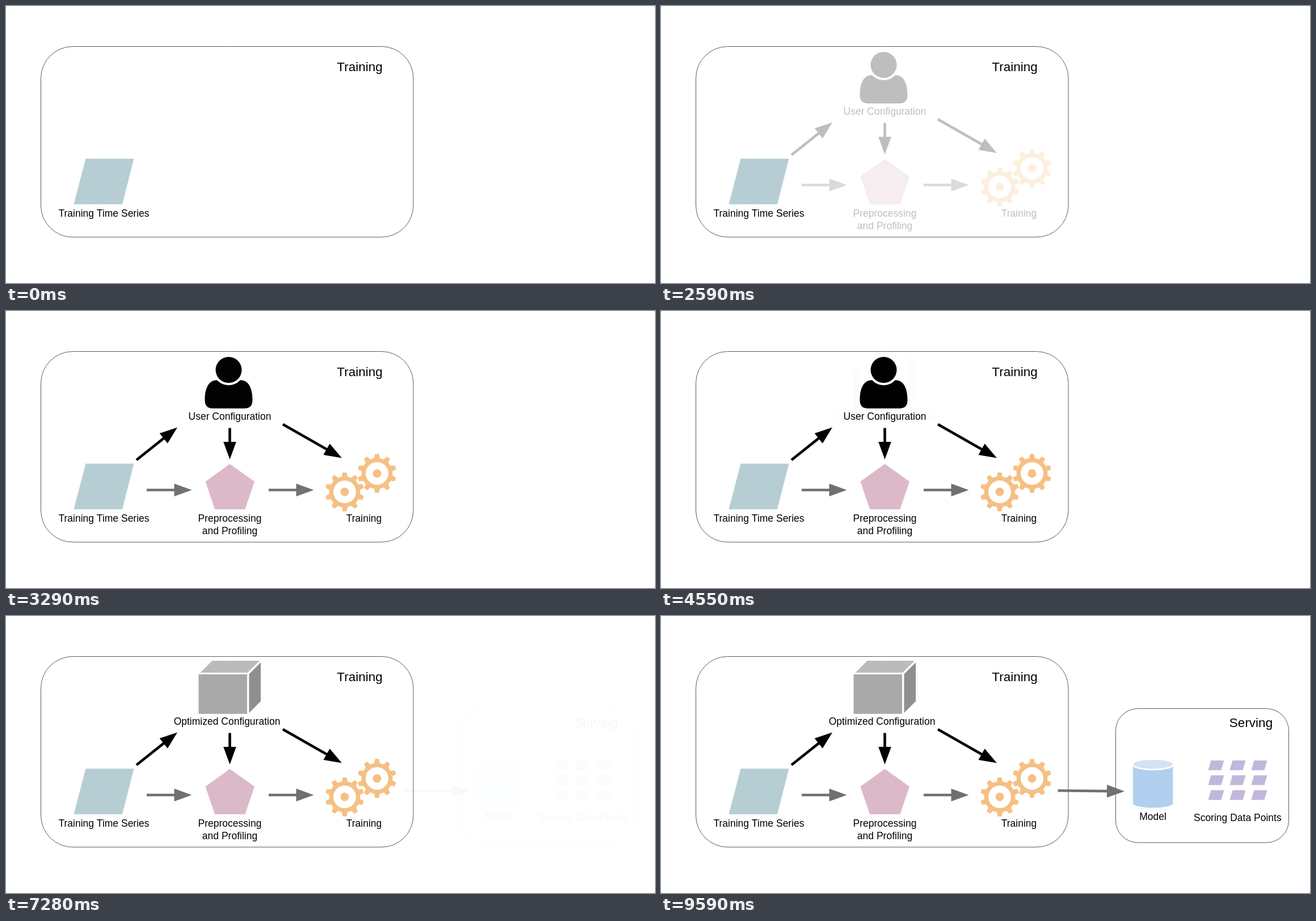
Animation, 1144 px wide and 489 px high, one loop 9730 ms. Source, as an HTML page with a canvas:

```html
<!DOCTYPE html>
<html lang="en">
<head>
<meta charset="utf-8">
<title>Training and serving pipeline</title>
<style>
html, body { margin: 0; width: 100%; height: 100%; overflow: hidden; background: #fff; }
canvas { display: block; width: 1144px; height: 489px; }
</style>
</head>
<body>
<canvas id="stage" width="1144" height="489"></canvas>
<script>
const W = 1144, H = 489, LOOP = 9730, STEP = 70;
const BLACK = '#000', GRAY = '#707070';
const ctx = document.getElementById('stage').getContext('2d');

// Each layer is painted once and then faded as a whole.
function layer(paint) {
  const c = document.createElement('canvas');
  c.width = W;
  c.height = H;
  paint(c.getContext('2d'));
  return c;
}

function poly(g, color, ...pts) {
  g.fillStyle = color;
  g.beginPath();
  pts.forEach(([x, y]) => g.lineTo(x, y));
  g.closePath();
  g.fill();
}

function label(g, text, x, y, size = 17.5) {
  g.font = `${size}px "Liberation Sans", Arial, sans-serif`;
  g.textAlign = 'center';
  g.fillStyle = BLACK;
  g.fillText(text, x, y);
}

function frame(g, x, y, w, h, r) {
  g.strokeStyle = '#595959';
  g.lineWidth = 1;
  g.beginPath();
  g.roundRect(x, y, w, h, r);
  g.stroke();
}

function arrow(g, color, x1, y1, x2, y2) {
  const len = Math.hypot(x2 - x1, y2 - y1), neck = len - 31;
  g.save();
  g.translate(x1, y1);
  g.rotate(Math.atan2(y2 - y1, x2 - x1));
  poly(g, color, [0, -2.3], [neck, -2.3], [neck, -11.3], [len, 0],
    [neck, 11.3], [neck, 2.3], [0, 2.3]);
  g.restore();
}

function gear(g, cx, cy) {
  const teeth = 10, pitch = 2 * Math.PI / teeth;
  const profile = [[-0.29, 27.5], [-0.16, 34.5], [0.16, 34.5], [0.29, 27.5]];
  for (let i = 0; i < teeth; i++) {
    for (const [off, r] of profile) {
      const a = -Math.PI / 2 + (i + off) * pitch;
      const x = cx + r * Math.cos(a), y = cy + r * Math.sin(a);
      if (i === 0 && off === -0.29) g.moveTo(x, y);
      else g.lineTo(x, y);
    }
  }
  g.closePath();
  g.moveTo(cx + 20, cy);
  g.arc(cx, cy, 20, 0, 2 * Math.PI, true);
  g.moveTo(cx + 7.5, cy);
  g.arc(cx, cy, 7.5, 0, 2 * Math.PI);
}

const base = layer(g => {
  frame(g, 61.5, 71.5, 656.5, 336.5, 56);
  label(g, 'Training', 623.5, 115, 22.5);
  poly(g, '#b6ced3', [140.5, 269.5], [225.5, 269.5], [205, 350], [119.5, 350]);
  label(g, 'Training Time Series', 172.5, 371.8);
  g.fillStyle = '#999';
  for (const x of [0, W - 1]) for (const y of [0, H - 1]) g.fillRect(x, y, 1, 1);
});

const pipeline = layer(g => {
  arrow(g, BLACK, 230, 263, 302, 205.5);
  arrow(g, BLACK, 394.5, 206.5, 394.5, 262);
  arrow(g, BLACK, 488, 200, 592, 259.5);
  arrow(g, GRAY, 248, 316, 327.5, 316);
  arrow(g, GRAY, 463, 316, 542.5, 316);
  poly(g, '#dcb9c9', [394.5, 270], [438, 301], [421.5, 350], [368, 350], [351.5, 301]);
  label(g, 'Preprocessing', 394.5, 371.8);
  label(g, 'and Profiling', 394.5, 393.5);
  g.fillStyle = '#f5c083';
  g.beginPath();
  gear(g, 597, 319.3);
  gear(g, 654, 286.7);
  g.fill();
  label(g, 'Training', 631, 371.8);
});

const user = layer(g => {
  g.fillStyle = '#fff';
  g.fillRect(349, 79, 86.5, 94);
  g.fillStyle = BLACK;
  g.beginPath();
  g.arc(392.5, 104, 23, 0, 2 * Math.PI);
  g.fill();
  g.beginPath();
  g.arc(392.5, 103, 28, 0.75, Math.PI - 0.75, false);
  g.bezierCurveTo(357, 122, 350.5, 137, 350.5, 157);
  g.bezierCurveTo(350.5, 167, 355, 172, 365, 172);
  g.lineTo(420, 172);
  g.bezierCurveTo(430, 172, 434.5, 167, 434.5, 157);
  g.bezierCurveTo(434.5, 137, 428, 122, 413, 122);
  g.fill();
  label(g, 'User Configuration', 394.5, 192.4);
});

const optimizer = layer(g => {
  poly(g, '#bbbbb9', [342.5, 100], [363.5, 79], [447, 79], [426, 100]);
  poly(g, '#a9a9a9', [339.5, 103], [425, 103], [425, 172.7], [339.5, 172.7]);
  poly(g, '#8f8f8f', [428.5, 102.5], [449, 82], [449, 150.5], [428.5, 171]);
  label(g, 'Optimized Configuration', 389.5, 192.4);
});

const serving = layer(g => {
  frame(g, 801.5, 163.5, 305, 236.5, 39);
  label(g, 'Serving', 1040, 196.3, 22.5);
  arrow(g, GRAY, 699.5, 308.2, 817, 309.5);

  const cx = 867.2, rx = 35.2;
  g.fillStyle = '#b1cfee';
  g.beginPath();
  g.ellipse(cx, 331, rx, 7.5, 0, 0, Math.PI);
  g.lineTo(cx - rx, 262);
  g.lineTo(cx + rx, 262);
  g.fill();
  g.beginPath();
  g.ellipse(cx, 262, rx, 8, 0, 0, 2 * Math.PI);
  g.fillStyle = '#d2e4f4';
  g.fill();
  g.strokeStyle = '#fff';
  g.lineWidth = 3;
  g.beginPath();
  g.ellipse(cx, 262, rx + 1, 9, 0, 0, Math.PI);
  g.stroke();
  label(g, 'Model', 867, 360);

  for (let i = 0; i < 9; i++) {
    const x = 964.5 + (i % 3) * 38, y = 255 + Math.floor(i / 3) * 26.2;
    poly(g, '#c1b7db', [x + 5, y], [x + 28, y], [x + 23, y + 17.3], [x, y + 17.3]);
  }
  label(g, 'Scoring Data Points', 1016.3, 361.8);
});

const ramp = (t, start, len) => Math.min(1, Math.max(0, (t - start) / len));

function show(image, alpha) {
  if (alpha <= 0) return;
  ctx.globalAlpha = alpha;
  ctx.drawImage(image, 0, 0);
}

function render(now) {
  const t = Math.floor((now % LOOP) / STEP) * STEP;
  const intro = t < 2590 ? 0 : ramp(t, 2350, 950);
  ctx.globalAlpha = 1;
  ctx.fillStyle = '#fff';
  ctx.fillRect(0, 0, W, H);
  show(optimizer, ramp(t, 4530, 1000));
  show(user, intro * (1 - ramp(t, 4570, 1000)));
  show(base, 1);
  show(pipeline, intro);
  show(serving, ramp(t, 7250, 1000));
}

const began = performance.now();
function tick() {
  render(performance.now() - began);
  requestAnimationFrame(tick);
}
tick();
</script>
</body>
</html>
```
